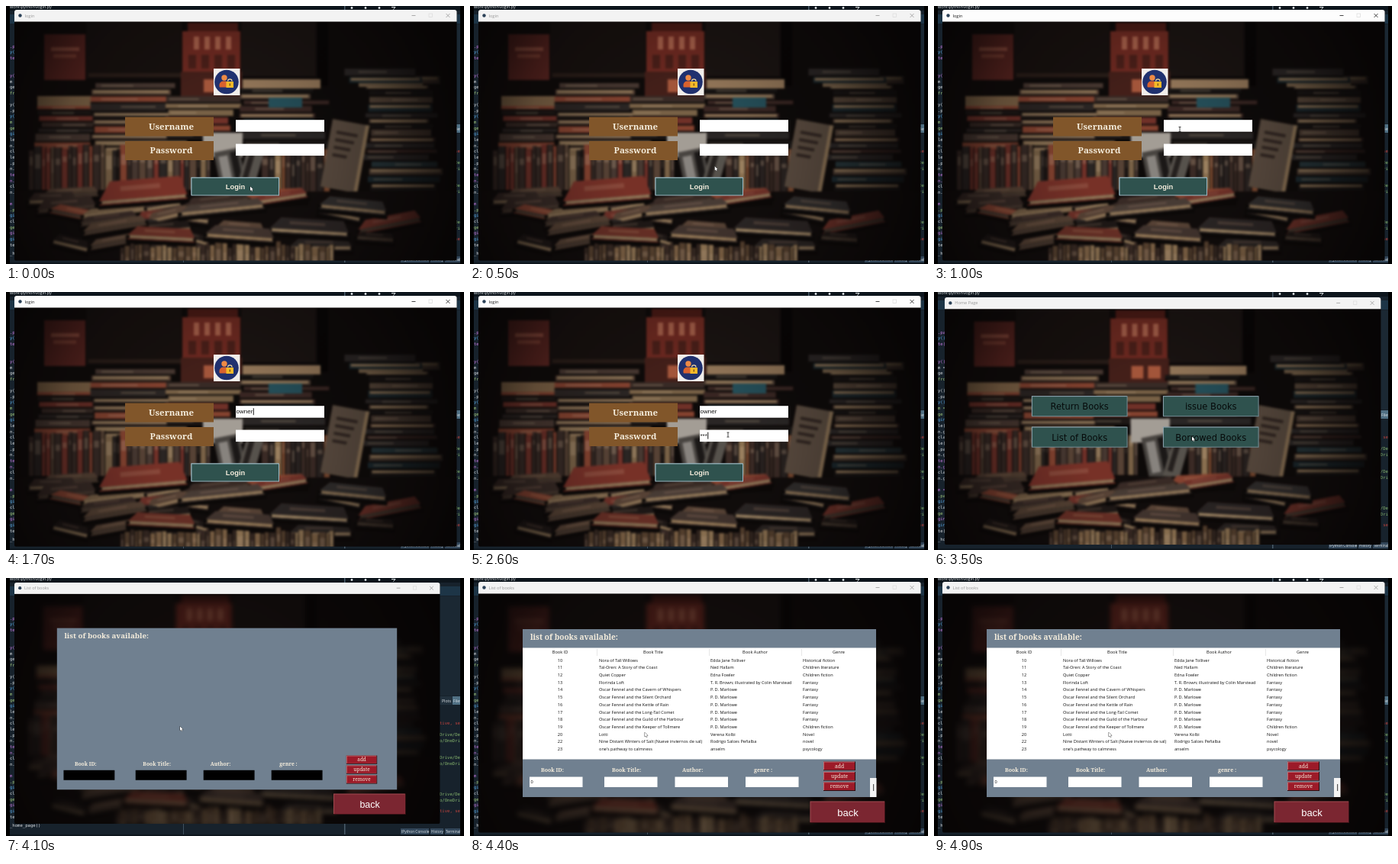
An HTML page with a canvas that plays this animation: 600 by 338 pixels, repeating every 5 s.

```html
<!DOCTYPE html>
<html lang="en">
<head>
<meta charset="utf-8">
<title>Library login</title>
<style>
  html, body { margin: 0; width: 100%; height: 100%; overflow: hidden; background: #000; }
  canvas { display: block; width: 600px; height: 338px; }
</style>
</head>
<body>
<canvas id="stage" width="600" height="338"></canvas>
<script>
const W = 600, H = 338, LOOP = 5000, STEP = 100;
const HOME_AT = 3400, LIST_AT = 4000;
const UI = '"Open Sans", sans-serif';
const ARIAL = '"Liberation Sans", Arial, sans-serif';
const SERIF = '"Noto Serif", serif';
const WIDE = '"DejaVu Sans", sans-serif';
const MONO = '"DejaVu Sans Mono", monospace';
const CREAM = '#f4ecdc', SLATE = '#708090', TEAL = '#2f524e';
const stage = document.getElementById('stage').getContext('2d');
let ctx = stage;

const clamp = (v, lo, hi) => Math.max(lo, Math.min(hi, v));

function rect(x, y, w, h, color) {
  ctx.fillStyle = color;
  ctx.fillRect(x, y, w, h);
}

function text(s, x, y, size, color, font = UI, align = 'left', weight = 400) {
  ctx.font = `${weight} ${size}px ${font}`;
  ctx.textAlign = align;
  ctx.fillStyle = color;
  ctx.fillText(s, x, y);
}

function line(color, width, ...pts) {
  ctx.strokeStyle = color;
  ctx.lineWidth = width;
  ctx.beginPath();
  for (let i = 0; i < pts.length; i += 2) ctx.lineTo(pts[i], pts[i + 1]);
  ctx.stroke();
}

function disc(x, y, r, color) {
  ctx.fillStyle = color;
  ctx.beginPath();
  ctx.arc(x, y, r, 0, 7);
  ctx.fill();
}

function layer(paint) {
  const c = document.createElement('canvas');
  c.width = W;
  c.height = H;
  const prev = ctx;
  ctx = c.getContext('2d');
  paint();
  ctx = prev;
  return c;
}

function random(seed) {
  return () => (seed = (seed * 16807) % 2147483647) / 2147483647;
}

// Bookshop backdrop
const WARM = ['#74332a', '#7d6549', '#3a2c27', '#1f1917', '#5a4537', '#2c2624', '#8a4532', '#4a3a33'];
const COOL = ['#2c2827', '#1c2a2f', '#4c3d33', '#191615', '#5b4a3c', '#27383d', '#3a2723'];
const PAGES = '#947a5b';

function paintBooks() {
  const rnd = random(4127);
  const pick = list => list[Math.floor(rnd() * list.length)];

  function tilted(x, y, turn, paint) {
    ctx.save();
    ctx.translate(x, y);
    ctx.rotate(turn);
    paint();
    ctx.restore();
  }

  // Books piled flat: a spine, a shadow, now and then a strip of pages
  function pile(x, y, w, bottom, tones) {
    while (y < bottom) {
      const h = 6 + rnd() * 6, bw = w * (0.85 + rnd() * 0.2), px = x + rnd() * 10 - 5;
      rect(px, y, bw, h, pick(tones));
      if (rnd() < 0.4) rect(px + 2, y + 1, bw - 5, 3.5, PAGES);
      else rect(px + bw * rnd() * 0.4, y + h * 0.3, bw * 0.4, 2, 'rgba(190,165,135,.35)');
      rect(px, y + h - 2, bw, 2.5, '#0c0908');
      y += h;
    }
  }

  // Books standing upright
  function row(x, y, w, h, tones) {
    for (let p = x; p < x + w;) {
      const bw = 4 + rnd() * 7, drop = rnd() * 9;
      rect(p, y + drop, bw - 1, h - drop, pick(tones));
      rect(p + bw - 1, y + drop, 1.5, h - drop, '#0c0908');
      rect(p + 1, y + drop + 7 + rnd() * 9, bw - 3, 5 + rnd() * 14, 'rgba(200,170,140,.3)');
      p += bw;
    }
  }

  function lying(x, y, w, h, turn, cover, pages = PAGES) {
    tilted(x, y, turn, () => {
      rect(-2, h, w + 4, 11, '#0b0807');
      ctx.fillStyle = cover;
      ctx.beginPath();
      ctx.moveTo(w * 0.14, 0);
      ctx.lineTo(w * 0.93, 0);
      ctx.lineTo(w, h);
      ctx.lineTo(0, h);
      ctx.fill();
      rect(w * 0.03, h, w * 0.95, 4, pages);
      rect(0, h + 4, w, 1.5, cover);
      rect(w * 0.25, h * 0.3, w * 0.45, h * 0.25, 'rgba(200,160,130,.22)');
    });
  }

  rect(0, 0, W, H, '#0e0a09');
  rect(105, 20, 125, 75, '#17110f');
  rect(308, 20, 98, 72, '#1a1412');
  rect(108, 88, 122, 5, '#2a1e19');
  rect(408, 20, 14, 85, '#060404');

  rect(50, 37, 54, 60, '#5f2621');
  rect(59, 54, 37, 5, '#97503f');
  rect(62, 63, 30, 5, '#854033');
  rect(238, 22, 66, 12, '#4a1a15');
  rect(231, 33, 76, 54, '#702a21');
  rect(229, 86, 80, 32, '#46201a');
  for (let i = 0; i < 4; i++) {
    rect(246 + i * 14, 40, 7, 17, '#a8604a');
    rect(239 + i * 17, 64, 10, 18, '#4b1f19');
  }
  rect(259, 96, 16, 17, '#a9583c');
  rect(281, 96, 17, 17, '#a9583c');

  pile(42, 131, 74, 190, WARM);
  rect(41, 118, 72, 13, '#86694a');
  pile(114, 101, 120, 190, WARM);
  pile(210, 118, 95, 172, WARM);
  row(30, 181, 236, 60, WARM);
  pile(308, 108, 108, 188, COOL);
  rect(310, 96, 102, 12, '#96795a');
  rect(344, 120, 44, 13, '#25505a');
  pile(474, 92, 92, 250, COOL);
  pile(448, 82, 96, 98, COOL);
  rect(462, 101, 84, 5, '#7d674d');

  row(335, 186, 86, 66, ['#7d4a30', '#2a2321', '#8f7452', '#3c2c26']);
  rect(258, 166, 52, 32, '#aaa39b');
  tilted(272, 192, -0.2, () => {
    rect(0, 0, 34, 60, '#4b4743');
    rect(5, 7, 12, 42, '#8d8883');
    rect(21, 4, 9, 48, '#1c1918');
  });
  tilted(318, 182, 0.28, () => {
    rect(0, 0, 22, 62, '#5a554f');
    rect(4, 10, 7, 44, '#26211f');
  });
  tilted(428, 148, 0.18, () => {
    rect(0, 0, 46, 90, '#5f5043');
    rect(44, 0, 5, 92, '#93795a');
    for (let i = 0; i < 4; i++) rect(8, 14 + i * 10, 28 - i * 3, 4, '#322722');
  });

  rect(12, 243, 578, 92, '#110c0b');
  for (let i = 0; i < 30; i++) {
    const x = 22 + rnd() * 450, y = 240 + i * 2.5;
    lying(x, y, 45 + rnd() * 50, 6 + rnd() * 8, rnd() * 0.5 - 0.25, pick(WARM), pick([PAGES, '#4a3c31']));
  }
  row(150, 308, 275, 28, ['#87694a', '#5c4532', '#997c59', '#3a2b24']);
  lying(120, 231, 116, 25, -0.08, '#7c3329');
  lying(226, 262, 112, 9, -0.1, '#4a3d36');
  lying(346, 276, 104, 15, 0.06, '#2d2726', '#ab906d');
  lying(412, 248, 88, 12, 0.1, '#33302f');
  lying(160, 288, 88, 12, 0.05, '#6e3227');
  lying(262, 286, 90, 12, 0.07, '#443630', '#a1835f');

  const v = ctx.createRadialGradient(280, 190, 90, 285, 188, 325);
  v.addColorStop(0, 'rgba(8,5,5,0)');
  v.addColorStop(0.5, 'rgba(8,5,5,.28)');
  v.addColorStop(1, 'rgba(6,4,4,.94)');
  ctx.fillStyle = v;
  ctx.fillRect(0, 0, W, H);
}

const sharp = layer(paintBooks);
const blurred = (px, dim) => layer(() => {
  ctx.filter = `blur(${px}px)`;
  ctx.drawImage(sharp, 0, 0);
  ctx.filter = 'none';
  rect(0, 0, W, H, `rgba(8,6,6,${dim})`);
});
const photo = blurred(1.6, 0.04);
const dimPhoto = blurred(3.2, 0.45);

// Code editor behind the windows
const editor = layer(() => {
  rect(5, 0, 590, H, '#17222c');
  rect(5, 0, 590, 6, '#0d151c');
  rect(5, 11, 590, 12, '#1d3547');
  text('work\\python\\login.py', 5, 3.2, 5.5, '#d5d9dc');
  [453, 471, 489].forEach(x => disc(x, 2.5, 1.4, '#dfe5e8'));
  line('#dfe5e8', 1, 505, 1.5, 510, 1.5, 507.5, 4.5);
  const code = ['from tkinter', 'import os', 'gin()', 'class Login:', '', 'def page(self):', 'le()', 'ge = None',
    'te(root)', 'n.grid()', '.pack()', 'y()', 'm = Frame()'];
  const ink = ['#c678dd', '#58a6e0', '#d8dcdf', '#d8dcdf', '#d8dcdf', '#a3c97b'];
  const rnd = random(91);
  for (let i = 0; i < 39; i++) {
    const s = code[Math.floor(rnd() * code.length)], color = ink[Math.floor(rnd() * ink.length)];
    if (i > 3 && i !== 7 && i !== 8) text(s, 5, 24 + i * 7.65, 5.6, color, MONO);
  }
  text('_home_page()', 5, 325.5, 5.6, '#d8dcdf', MONO);
  rect(443, 0, 1.5, H, '#4a5c6a');
  rect(232, 322, 1, 14, '#40515f');
  rect(444, 24, 151, 130, '#1b2833');
  rect(568, 155, 27, 11, '#22313d');
  rect(585, 155, 10, 11, '#507084');
  text('Plots', 571, 162.5, 5.2, '#e1e5e8');
  text('Files', 586, 162.5, 5.2, '#e1e5e8');
  const log = (s, y, color) => text(s, 568, y, 5.6, color, MONO);
  [192, 307].forEach(y => log('tive, se', y, '#c0433e'));
  [207, 237, 285].forEach(y => {
    log('Drive/De', y, '#86b56d');
    log('o/OneDri', y + 7.5, '#86b56d');
  });
  rect(5, 336, 590, 2, '#0e161d');
  [['IPython Console', 517, 37], ['History', 556, 17], ['Terminal', 575, 20]].forEach(([s, x, w]) => {
    rect(x, 328, w, 8, '#33475a');
    text(s, x + 1, 334, 4.8, '#dfe4e7');
  });
  rect(595, 0, 5, H, '#000');
});

// Window frame, laid out at its full size
function appWindow(title, active, backdrop, body) {
  ctx.save();
  ctx.beginPath();
  ctx.roundRect(11, 5, 579.5, 328.5, [3, 3, 2, 2]);
  ctx.clip();
  ctx.drawImage(backdrop, 0, 0);
  rect(11, 5, 580, 15.5, active ? '#fdfdfd' : '#f3f3f3');
  disc(18.5, 12.5, 2.2, '#2c4258');
  const ink = active ? '#1a1a1a' : '#999';
  text(title, 24.5, 14.5, 5.7, ink);
  line(ink, 0.8, 531.5, 12.5, 536.5, 12.5);
  ctx.strokeStyle = '#dedede';
  ctx.strokeRect(554, 10, 4.5, 4.5);
  line(ink, 0.8, 576.5, 10, 581.5, 15);
  line(ink, 0.8, 581.5, 10, 576.5, 15);
  body();
  ctx.restore();
}

function button(x, y, w, h, fill, light, dark) {
  rect(x, y, w, h, dark);
  rect(x, y, w - 1, h - 1, light);
  rect(x + 1, y + 1, w - 2, h - 2, fill);
}

function badge() {
  rect(272, 82, 34.5, 35, '#f1eeea');
  disc(289, 99.5, 15.8, '#20316f');
  disc(286, 94, 3.7, '#ee8a45');
  ctx.fillStyle = '#d9622e';
  ctx.beginPath();
  ctx.roundRect(279.5, 98.5, 13, 8, [5, 5, 1, 1]);
  ctx.fill();
  ctx.strokeStyle = '#f3d9a0';
  ctx.lineWidth = 1.2;
  ctx.beginPath();
  ctx.arc(293.3, 98.6, 2.7, Math.PI, 0);
  ctx.stroke();
  rect(288.5, 99, 9.5, 8, '#f4b929');
  rect(292.7, 101.5, 1.2, 3, '#6b4516');
}

function entry(value, y, focused, t) {
  rect(301, y, 116, 15.5, '#fff');
  text(value, 301.5, y + 10.2, 8, '#111', ARIAL);
  if (focused && t % 1000 < 800) rect(302 + ctx.measureText(value).width, y + 3, 0.9, 9, '#000');
}

function login(t) {
  badge();
  [['Username', 145.5], ['Password', 177]].forEach(([s, y]) => {
    rect(156, y, 116, 25, '#81562a');
    text(s, 216.5, y + 16.3, 11.5, CREAM, SERIF, 'center', 700);
  });
  const typed = (s, from) => s.slice(0, clamp(Math.floor((t - from) / 100), 0, s.length));
  entry(typed('owner', 1200), 149.2, t > 1000 && t < 2200, t);
  entry(typed('*****', 2300), 180.6, t >= 2200, t);
  button(242.5, 224.5, 115.5, 24, TEAL, '#9db9c4', '#9db9c4');
  text('Login', 300.5, 240.2, 9.3, CREAM, ARIAL, 'center', 700);
}

function home() {
  [['Return Books', 0, 0], ['issue Books', 1, 0], ['List of Books', 0, 1], ['Borrowed Books', 1, 1]].forEach(([s, c, r]) => {
    const x = 126.5 + c * 174.5, y = 136 + r * 41;
    button(x, y, 127.5, 27.5, TEAL, '#8ea5b0', '#71878f');
    text(s, x + 63.7, y + 18.2, 11.65, '#070b0b', WIDE, 'center');
  });
}

const saga = (s, genre = 'Fantasy') => ['Oscar Fennel and the ' + s, 'P. D. Marlowe', genre];
const BOOKS = [
  ['Nora of Tall Willows', 'Edda Jane Tolliver', 'Historical fiction'],
  ['Tal-Oren: A Story of the Coast', 'Ned Hallam', 'Children literature'],
  ['Quiet Copper', 'Edna Fowler', 'Children fiction'],
  ['Florinda Loft', 'T. R. Brown; illustrated by Colin Marstead', 'Fantasy'],
  saga('Cavern of Whispers'),
  saga('Silent Orchard'),
  saga('Kettle of Rain'),
  saga('Long-Tail Comet'),
  saga('Guild of the Harbour'),
  saga('Keeper of Tollmere', 'Children fiction'),
  ['Lotti', 'Verena Kolbi', 'Novel'],
  ['Nine Distant Winters of Salt (Nueve inviernos de sal)', 'Rodrigo Salces Peñalba', 'novel'],
  ["one's pathway to calmness", 'anselm', 'psycology']
];

function table() {
  rect(69, 91.5, 463, 146, '#fff');
  [['Book ID', 118], ['Book Title', 240], ['Book Author', 373.5], ['Genre', 483]].forEach(([s, x]) =>
    text(s, x, 99.3, 5.6, '#111', UI, 'center'));
  [166, 313, 434].forEach(x => rect(x, 93, 0.7, 9, '#ddd'));
  BOOKS.forEach(([title, author, genre], i) => {
    const y = 109.6 + i * 9.7;
    text(i + (i > 10 ? 11 : 10), 118, y, 5.6, '#111', UI, 'center');
    text(title, 169, y, 5.6, '#111');
    text(author, 315, y, 5.6, '#111');
    text(genre, 436, y, 5.6, '#111');
  });
}

function bookList(ready) {
  rect(69, 67, 463, 220, SLATE);
  text('list of books available:', 79, 81, 10.1, CREAM, SERIF, 'left', 700);
  if (ready) table();
  [['Book ID:', 93, 78], ['Book Title:', 186, 176], ['Author:', 278, 268.5], ['genre :', 372, 361]].forEach(([s, x, box]) => {
    text(s, x, 254, 7, CREAM, SERIF, 'left', 700);
    rect(box, 260.5, 69.5, 13.5, ready ? '#fff' : '#000');
  });
  ['add', 'update', 'remove'].forEach((s, i) => {
    const y = 240.5 + i * 13.4;
    button(463, y, 42, 11.7, '#9c1a28', '#c26a70', '#2b1013');
    text(s, 484, y + 8, 6.7, CREAM, SERIF, 'center', 500);
  });
  if (ready) {
    text('0', 79.5, 269.2, 5.6, '#111');
    rect(524, 262, 8.5, 25, '#f4f4f4');
    rect(528, 270, 1.2, 9, '#555');
  }
  button(445.5, 292.5, 98.5, 28.5, '#7b2631', '#a04a50', '#3a1216');
  text('back', 495, 311.5, 13, '#fff', ARIAL, 'center');
}

// Opening zoom: gap is the missing scale one step after the start
function opening(age, gap, dx, dy, draw) {
  const off = age < 300 ? gap * 4 ** (1 - age / 100) : 0;
  const miss = off < 0.005 ? 0 : off;
  ctx.save();
  ctx.globalAlpha = age < 100 ? 0.6 : 1;
  ctx.translate(11 + miss * dx, 5 + miss * dy);
  ctx.scale(1 - miss, 1 - miss);
  ctx.translate(-11, -5);
  draw();
  ctx.restore();
}

const PATH = [
  [0, 320, 236.5], [300, 320, 236.5], [800, 322, 161.5], [1800, 322, 161.5], [2200, 338, 187],
  [3400, 338, 187], [3500, 338, 189.5], [3600, 338, 189.5], [3900, 228, 194.5], [4100, 228, 194.5],
  [4400, 229, 202.5], [5000, 229, 202.5]
];

function pointer(t) {
  const i = PATH.findIndex(p => p[0] > t), [t0, x0, y0] = PATH[i - 1], [t1, x1, y1] = PATH[i];
  const k = (t - t0) / (t1 - t0), e = k * k * (3 - 2 * k);
  const x = x0 + (x1 - x0) * e, y = y0 + (y1 - y0) * e;
  if (t < HOME_AT && t > 1200 && t <= 1700) return;
  const inField = (y > 149 && y < 166) || (y > 180 && y < 197);
  if (t < HOME_AT && inField && x > 301) {
    line('#222', 0.8, x, y - 3, x, y + 3);
    line('#222', 0.8, x - 1.5, y - 3, x + 1.5, y - 3);
    line('#222', 0.8, x - 1.5, y + 3, x + 1.5, y + 3);
    return;
  }
  ctx.beginPath();
  [[0, 0], [0, 5.4], [1.2, 4.3], [2.1, 6.2], [3, 5.8], [2.2, 3.9], [3.8, 3.8]].forEach(([dx, dy]) => ctx.lineTo(x + dx, y + dy));
  ctx.closePath();
  ctx.fillStyle = '#fff';
  ctx.strokeStyle = '#222';
  ctx.lineWidth = 0.8;
  ctx.stroke();
  ctx.fill();
}

function draw(t) {
  rect(0, 0, W, H, '#000');
  ctx.drawImage(editor, 0, 0);
  if (t < HOME_AT) {
    appWindow('login', t >= 600, photo, () => login(t));
  } else if (t < LIST_AT) {
    opening(t - HOME_AT, 0.014, 214, 143, () => appWindow('Home Page', false, photo, home));
  } else {
    const age = t - LIST_AT;
    opening(age, 0.038, 0, 26, () => appWindow('List of books', false, dimPhoto, () => bookList(age >= 200)));
  }
  pointer(t);
}

const start = performance.now();
function tick() {
  const t = (performance.now() - start) % LOOP;
  draw(Math.floor(t / STEP) * STEP);
  requestAnimationFrame(tick);
}
tick();
</script>
</body>
</html>
```
